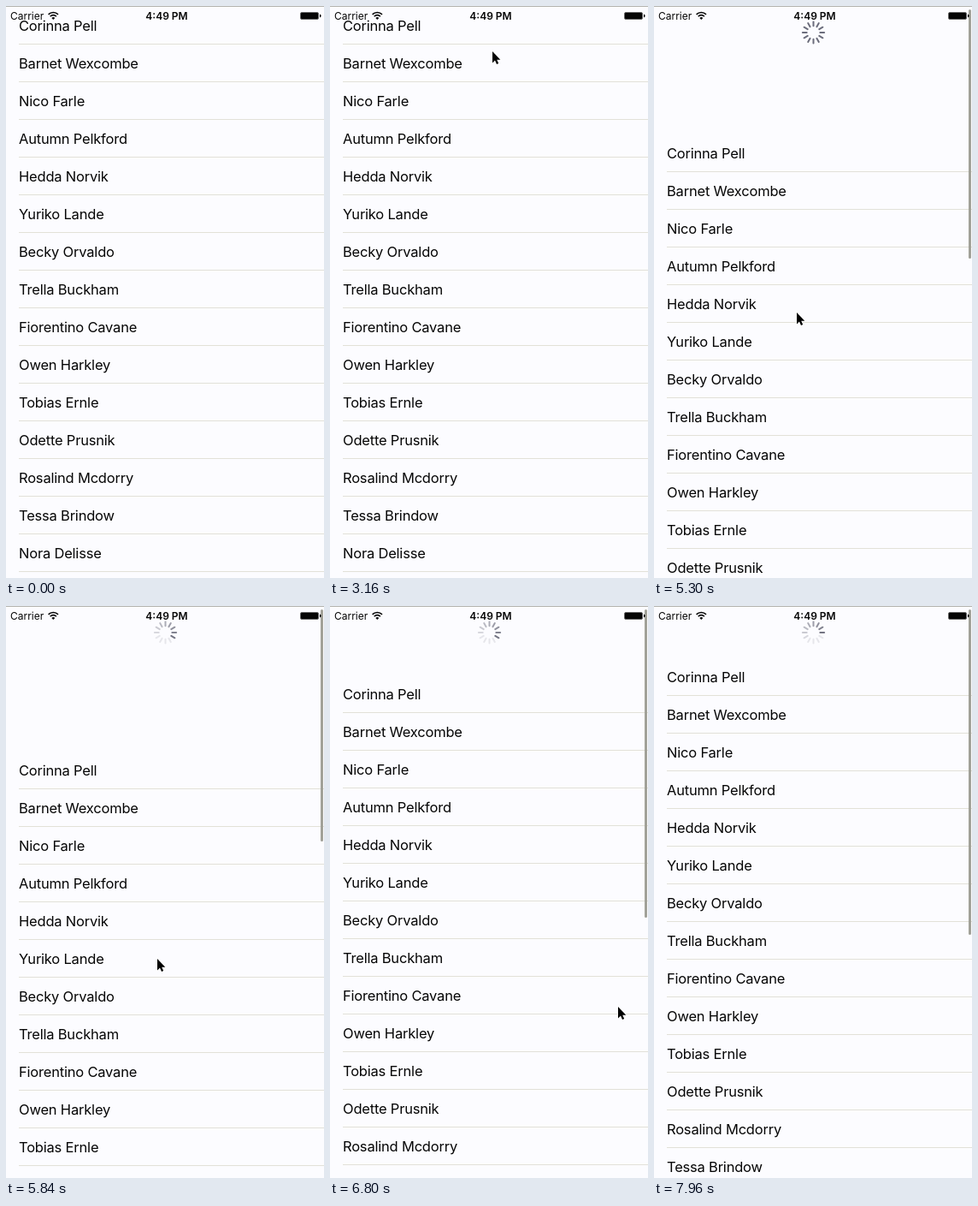
Write an HTML page that moves like this. It is 372 px wide and 668 px high and loops after 8 s.

```html
<!DOCTYPE html>
<html lang="en">
<head>
<meta charset="utf-8">
<title>Pull to refresh</title>
<style>
  html, body { margin: 0; width: 100%; height: 100%; overflow: hidden; background: #fcfcff; }
  svg { display: block; width: 372px; height: 668px; }
  text { font-family: Inter, Roboto, sans-serif; fill: #060606; }
  #list text { font-size: 16.5px; letter-spacing: -0.2px; }
  #list path { stroke: #e2e1d8; }
  .status { font-size: 12px; }
</style>
</head>
<body>
<svg viewBox="0 0 372 668">
  <rect width="372" height="668" fill="#fcfcff"/>
  <g id="list"></g>
  <g id="spinner" stroke="#6c6d7c" stroke-width="2" stroke-linecap="round"></g>
  <rect id="bar" x="368" y="4" width="3" rx="1.5" fill="#a1a198"/>
  <rect width="372" height="1" fill="#b4b4ae"/>
  <text class="status" x="5" y="15.5">Carrier</text>
  <g fill="none" stroke="#060606" stroke-width="1.6">
    <path d="M49.6 9.9a8 8 0 0 1 11.4 0M51.7 12.2a5 5 0 0 1 7.2 0"/>
    <path d="M55.3 16l-2-2.1a2.9 2.9 0 0 1 4 0z" fill="#060606" stroke="none"/>
  </g>
  <text class="status" x="188" y="15.5" text-anchor="middle" font-weight="600">4:49 PM</text>
  <rect x="344.5" y="7.5" width="21" height="8" rx="1.5" fill="#060606" stroke="#666"/>
  <path d="M367 9.5q1.6 .5 1.6 2t-1.6 2z" fill="#060606"/>
  <path id="cursor" d="M0 1V14.4L3 11.6L5 16L7.2 15L5.2 10.7H9.3Z"
        fill="#000" stroke="#fff" stroke-width="1.6" paint-order="stroke"/>
</svg>
<script>
const LOOP = 8000, ROW = 44, REST = 60;
const GRAB = 4760, ARMED = 5330, RELEASE = 6349;
const names = [
  'Corinna Pell', 'Barnet Wexcombe', 'Nico Farle', 'Autumn Pelkford', 'Hedda Norvik',
  'Yuriko Lande', 'Becky Orvaldo', 'Trella Buckham', 'Fiorentino Cavane', 'Owen Harkley',
  'Tobias Ernle', 'Odette Prusnik', 'Rosalind Mcdorry', 'Tessa Brindow', 'Nora Delisse'
];

// Pointer path: time, x, y
const track = [
  [2200, 374, 74], [2560, 215, 57], [3160, 190, 52], [3440, 190, 54], [4600, 189, 62],
  [GRAB, 189, 62], [5300, 167, 357], [5620, 174, 410], [6300, 185, 416],
  [6560, 185, 416], [6900, 376, 480]
];

const $ = id => document.getElementById(id);
const clamp = v => Math.max(0, Math.min(1, v));

function add(parent, tag, attrs, text = '') {
  const el = document.createElementNS('http://www.w3.org/2000/svg', tag);
  for (const key in attrs) el.setAttribute(key, attrs[key]);
  el.textContent = text;
  return parent.appendChild(el);
}

names.forEach((name, i) => {
  add($('list'), 'text', { x: 15, y: i * ROW + 29 }, name);
  add($('list'), 'path', { d: `M15 ${(i + 1) * ROW + 0.5}H372` });
});

const ticks = Array.from({ length: 12 }, (_, i) =>
  add($('spinner'), 'path', { d: 'M0 -7.8V-12.6', transform: `translate(186.5 31) rotate(${i * 30})` }));

function pointer(t) {
  const i = track.findIndex(p => p[0] > t);
  if (i < 1) return null;
  const [t0, x0, y0] = track[i - 1], [t1, x1, y1] = track[i];
  const p = (t - t0) / (t1 - t0), e = p * p * (3 - 2 * p);
  return [x0 + (x1 - x0) * e, y0 + (y1 - y0) * e];
}

// Rubber band while held, exponential settling afterwards
function pull(t) {
  if (t < GRAB) return 0;
  if (t > RELEASE) return REST + (pull(RELEASE) - REST) * Math.exp((RELEASE - t) / 264);
  const dy = pointer(t)[1] - 62;
  return 667 * (1 - 1 / (1 + 0.65 * dy / 667));
}

function tickOpacity(i, t, y) {
  if (t < GRAB) return 0;
  if (t < ARMED) return clamp((y - 50) / 90 * 12 - i);
  const head = Math.floor(24 + (t - 7120) / (t < 7120 ? 40 : 56));
  const age = (((head - i) % 12) + 12) % 12;
  return Math.max(0.15, 0.95 - age / 10);
}

function draw(t) {
  const y = Math.round(pull(t)), at = pointer(t);
  $('list').setAttribute('transform', `translate(0 ${y})`);
  $('bar').setAttribute('height', 440 - y);
  $('bar').setAttribute('opacity', clamp((t - GRAB - 20) / 100));
  ticks.forEach((tick, i) => tick.setAttribute('opacity', tickOpacity(i, t, y)));
  $('cursor').setAttribute('visibility', at ? 'visible' : 'hidden');
  if (at) $('cursor').setAttribute('transform', `translate(${at.map(Math.round).join(' ')})`);
}

const start = performance.now();
function frame() {
  draw((performance.now() - start) % LOOP);
  requestAnimationFrame(frame);
}
draw(0);
requestAnimationFrame(frame);
</script>
</body>
</html>
```
